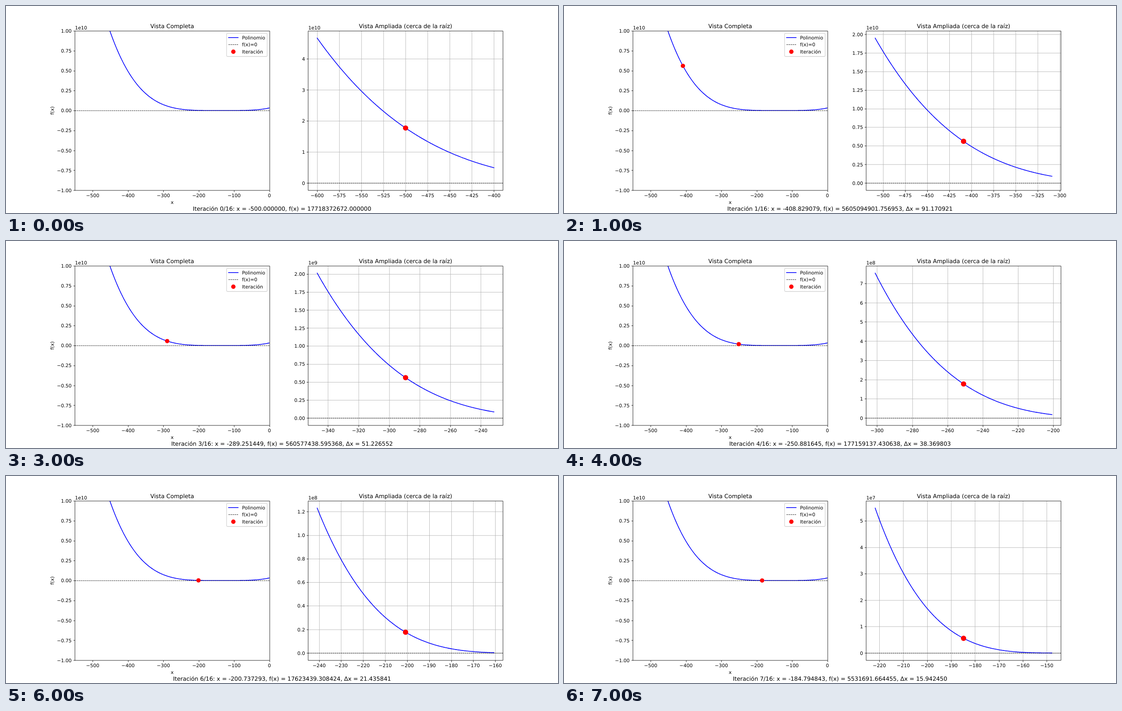
Recreate the animation shown at these times as an HTML page. Size 1222x458 px, loop 8 s.

```html
<!DOCTYPE html>
<html lang="es">
<head>
<meta charset="utf-8">
<title>Método de Newton</title>
<style>
  html, body { margin: 0; width: 100%; height: 100%; overflow: hidden; background: #fff; }
  svg { display: block; width: 1222px; height: 458px; }
  text { font-family: "DejaVu Sans", sans-serif; font-size: 13.889px; text-rendering: geometricPrecision; }
  .big { font-size: 16.667px; }
  .mid { text-anchor: middle; }
  .end { text-anchor: end; }
  path { fill: none; stroke: #000; stroke-width: 1.111; }
  .grid { stroke: #b0b0b0; }
  .curve { stroke: #00f; stroke-width: 2.083; stroke-linejoin: round; }
  .flat { stroke-linecap: butt; }
  .curve:not(.flat) { stroke-linecap: square; }
  .dash { stroke-dasharray: 4.11 1.778; }
  .frame { stroke-linecap: square; }
  circle { fill: #f00; }
  .step { visibility: hidden; animation: show 8s step-end infinite; }
  @keyframes show {
    0% { visibility: visible; }
    12.5%, 100% { visibility: hidden; }
  }
</style>
</head>
<body>
<svg viewBox="0 0 1600 600" preserveAspectRatio="none"></svg>
<script>
const TOP = 72, BOTTOM = 534, STEPS = 8, TOTAL = 16;
const LEFT = [200, 763.64], RIGHT = [876.36, 1440];

const f = x => (x + 126) ** 2 * (x + 136) * (x + 152);
const df = x => 2 * (x + 126) * (x + 136) * (x + 152) + (x + 126) ** 2 * (2 * x + 288);

const snap = v => Math.floor(v + 0.5) + 0.5;
const path = (d, cls) => `<path class="${cls}" d="${d}"/>`;
const text = (x, y, s, cls = '') => `<text class="${cls}" x="${x}" y="${y}">${s}</text>`;
const dot = (x, y, r) => `<circle cx="${x}" cy="${y}" r="${r}"/>`;
const num = (v, digits) => v.toFixed(digits).replace('-', '−');

function ticks([lo, hi]) {
  const range = hi - lo;
  const unit = 10 ** Math.floor(Math.log10(range / 9));
  const step = unit * [1, 2, 2.5, 5, 10].find(s => range / (s * unit) <= 9);
  const list = [];
  for (let i = Math.ceil(lo / step); i * step <= hi; i++) list.push(i * step);
  return { step, list };
}

function axes([x0, x1], xlim, ylim) {
  const px = x => x0 + (x - xlim[0]) / (xlim[1] - xlim[0]) * (x1 - x0);
  const py = y => BOTTOM - (y - ylim[0]) / (ylim[1] - ylim[0]) * (BOTTOM - TOP);
  const l = snap(x0), r = snap(x1), t = snap(TOP), b = snap(BOTTOM);
  const xt = ticks(xlim), yt = ticks(ylim);
  const exp = Math.floor(Math.log10(Math.max(...yt.list)) + 1e-9);
  const scale = 10 ** exp;
  const digits = [0, 1, 2].find(d => Math.abs(yt.step / scale * 10 ** d % 1) < 1e-6);
  const xs = xt.list.map(v => snap(px(v))), ys = yt.list.map(v => snap(py(v)));

  return {
    px, py,
    grid: () => path(xs.map(x => `M${x} ${b}V${t}`).join('') + ys.map(y => `M${l} ${y}H${r}`).join(''), 'grid'),
    zero: () => path(`M${x0} ${snap(py(0))}H${x1}`, 'dash'),
    curve(a, c) {
      const pts = Array.from({ length: 301 }, (_, i) => {
        const x = a + (c - a) * i / 300;
        return px(x).toFixed(2) + ' ' + py(f(x)).toFixed(2);
      });
      return path('M' + pts.join('L'), 'curve');
    },
    frame: () =>
      path(`M${l} ${t}H${r}V${b}H${l}Z`, 'frame') +
      path(xs.map(x => `M${x} ${b}v4.86`).join('') + ys.map(y => `M${l} ${y}h-4.86`).join(''), '') +
      xt.list.map(v => text(px(v), 554.7, num(v, 0), 'mid')).join('') +
      yt.list.map(v => text(x0 - 9.72, py(v) + 5.4, num(v / scale, digits), 'end')).join('') +
      text(x0, 67.8, '1e' + exp)
  };
}

function legend() {
  const rows = ['Polinomio', 'f(x)=0', 'Iteración'];
  const y = i => 91.5 + 20.5 * i;
  return '<rect x="639.5" y="79.2" width="117.5" height="67" rx="2.8" fill="#fff" fill-opacity=".8" stroke="#ccc" stroke-width="1.389"/>' +
    path(`M645 ${y(0)}h27.8`, 'curve') +
    path(`M645 ${y(1)}h27.8`, 'dash') +
    dot(659, y(2), 6.25) +
    rows.map((s, i) => text(684, y(i) + 5, s)).join('');
}

function zoom(x, i) {
  const half = i < 3 ? 100 : 0.2 * Math.abs(x);
  const a = x - half, c = x + half, pad = half * 0.1;
  const low = Math.min(0, f(c)), high = f(a), gap = (high - low) * 0.05;
  const ax = axes(RIGHT, [a - pad, c + pad], [low - gap, high + gap]);
  return ax.grid() + ax.curve(a, c) + ax.zero() + dot(ax.px(x), ax.py(f(x)), 7.64) + ax.frame();
}

const main = axes(LEFT, [-550, 0], [-1e10, 1e10]);
let dots = '', views = '';
for (let i = 0, x = -500, dx = 0; i < STEPS; i++) {
  const open = `<g class="step" style="animation-delay:${i ? i - STEPS : 0}s">`;
  const delta = i ? `, Δx = ${Math.abs(dx).toFixed(6)}` : '';
  const caption = `Iteración ${i}/${TOTAL}: x = ${x.toFixed(6)}, f(x) = ${f(x).toFixed(6)}${delta}`;
  dots += open + dot(main.px(x), main.py(f(x)), 6.25) + '</g>';
  views += open + zoom(x, i) + text(800, 594, caption, 'big mid') + '</g>';
  dx = f(x) / df(x);
  x -= dx;
}

document.querySelector('svg').innerHTML =
  `<clipPath id="area"><rect x="200" y="${TOP}" width="563.64" height="${BOTTOM - TOP}"/></clipPath>` +
  `<g clip-path="url(#area)">${main.curve(-550, 0)}${main.zero()}${dots}</g>` +
  main.frame() + legend() +
  text(481.8, 63.7, 'Vista Completa', 'big mid') +
  text(1158.2, 63.7, 'Vista Ampliada (cerca de la raíz)', 'big mid') +
  text(481.8, 574.3, 'x', 'mid') +
  '<text class="mid" transform="translate(139.2 303) rotate(-90)">f(x)</text>' +
  views;
</script>
</body>
</html>
```
